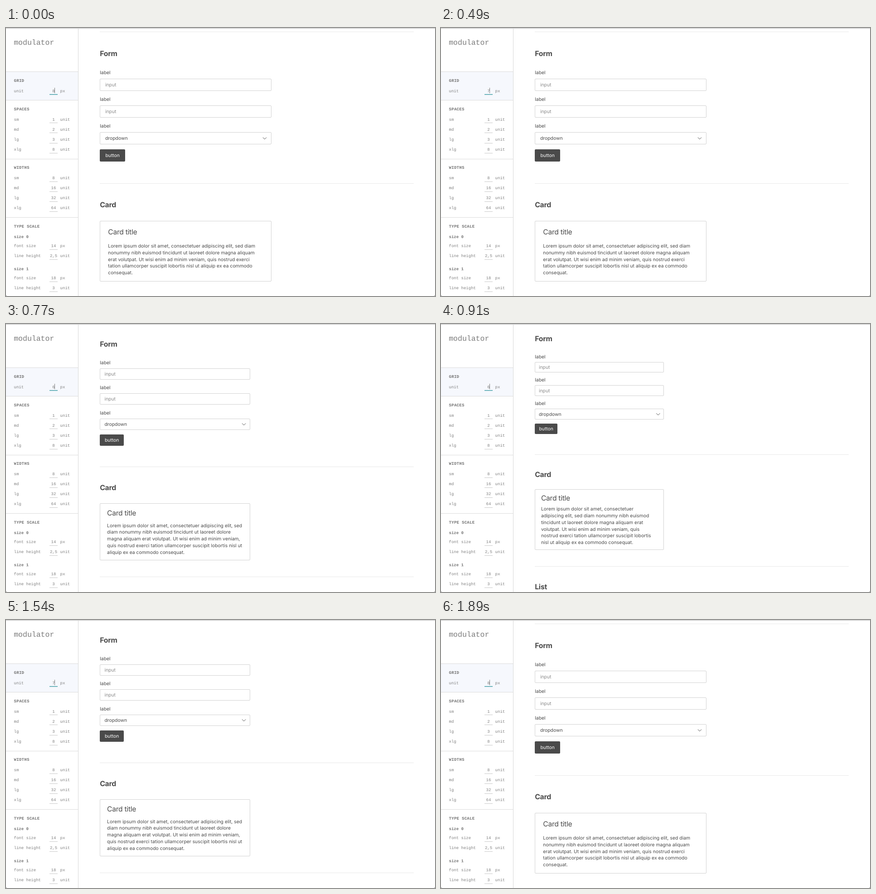
Animation of 947 by 592 pixels, one loop 2310 ms. Source, as an HTML page:

```html
<!DOCTYPE html>
<html lang="en">
<head>
<meta charset="utf-8">
<title>modulator</title>
<style>
  html, body { margin: 0; width: 100%; height: 100%; overflow: hidden; background: #fff; }
  svg { display: block; width: 947px; height: 592px; }
  text { white-space: pre; text-rendering: geometricPrecision; }
  .mono { font: 9.03px "Liberation Mono", monospace; fill: #808080; }
  .logo { font-size: 16.5px; fill: #7c7c7c; }
  .strong { font-weight: 700; fill: #747474; }
  .caps { letter-spacing: .28px; }
  .body { font: 10.4px Inter, sans-serif; fill: #4a4a4a; }
  .heading { font-size: 15.8px; font-weight: 700; letter-spacing: -.25px; }
  .title { font-size: 15.6px; letter-spacing: -.25px; }
  .hint { fill: #8a8a8a; }
  .light { fill: #fff; }
  .mid { text-anchor: middle; }
</style>
</head>
<body>
<svg viewBox="0 0 947 592">
  <g id="sidebar"></g>
  <g id="page"></g>
  <rect width="947" height="1.6" fill="#d2d2d2"/>
  <path d="M0 589v3h3q-3 0-3-3M947 589v3h-3q3 0 3-3" fill="#888"/>
</svg>
<script>
const LOOP = 2310;
const RIGHT = 900;
// [start time, unit]: the field changes first, the page follows
const FIELD = [[0, 8], [490, 7], [770, 6], [1540, 7], [1890, 8]];
const LAYOUT = [[0, 8], [630, 7], [910, 6], [1470, 7], [1680, 8]];
const PARAGRAPH = {
  8: `Lorem ipsum dolor sit amet, consectetuer adipiscing elit, sed diam
nonummy nibh euismod tincidunt ut laoreet dolore magna aliquam
erat volutpat. Ut wisi enim ad minim veniam, quis nostrud exerci
tation ullamcorper suscipit lobortis nisl ut aliquip ex ea commodo
consequat.`,
  7: `Lorem ipsum dolor sit amet, consectetuer adipiscing elit, sed
diam nonummy nibh euismod tincidunt ut laoreet dolore
magna aliquam erat volutpat. Ut wisi enim ad minim veniam,
quis nostrud exerci tation ullamcorper suscipit lobortis nisl ut
aliquip ex ea commodo consequat.`,
  6: `Lorem ipsum dolor sit amet, consectetuer
adipiscing elit, sed diam nonummy nibh euismod
tincidunt ut laoreet dolore magna aliquam erat
volutpat. Ut wisi enim ad minim veniam, quis
nostrud exerci tation ullamcorper suscipit lobortis
nisl ut aliquip ex ea commodo consequat.`
};

const text = (x, y, str, cls) => `<text x="${x}" y="${y}" class="${cls}">${str}</text>`;
const rect = (x, y, w, h, fill) =>
  `<rect x="${x}" y="${y}" width="${w}" height="${h}" fill="${fill}"/>`;
const rule = y => rect(207, Math.round(y - .5), RIGHT - 207, 1, '#e8e8e8');

function frame(top, bottom, right) {
  const y = Math.round(top), h = Math.round(bottom) - y - 1, w = Math.round(right) - 208;
  return `<rect x="207.5" y="${y + .5}" width="${w}" height="${h}" rx="1.5" fill="none" stroke="#d2d2d2"/>`;
}

function field(y, name, value, unit, active) {
  const line = active ? rect(96, Math.round(y + 7), 18, 1.5, '#45a0a8')
                      : rect(96, Math.round(y + 7.8), 18, 1, '#c9c9c9');
  return text(17.5, y + 3, name, 'mono') + line +
    text(105, y + 3, value, 'mono mid') + text(119.6, y + 3, unit, 'mono');
}

const fields = (y, rows) =>
  rows.map(([name, value, unit = 'unit'], i) => field(y + i * 22.15, name, value, unit)).join('');

function sidebar(unit) {
  const caps = (y, str) => text(17.5, y + 3, str, 'mono strong caps');
  const size = (y, str) => text(17.5, y + 3, str, 'mono strong');
  return rect(0, 97, 159, 62, '#f6f8fd') +
    [96, 159, 289, 418].map(y => rect(0, y, 159, 1, '#dcdcdc')).join('') +
    rect(159, 0, 1, 592, '#d8d8d8') +
    text(17.2, 37, 'modulator', 'mono logo') +
    caps(115.5, 'GRID') + field(138.6, 'unit', unit, 'px', true) +
    rect(107, 132, 1, 12, '#808080') +
    caps(178.5, 'SPACES') +
    fields(201.5, [['sm', 1], ['md', 2], ['lg', 3], ['xlg', 8]]) +
    caps(308, 'WIDTHS') +
    fields(331, [['sm', 8], ['md', 16], ['lg', 32], ['xlg', 64]]) +
    caps(437.5, 'TYPE SCALE') +
    size(460.5, 'size 0') + fields(481.3, [['font size', 14, 'px'], ['line height', '2,5']]) +
    size(531.5, 'size 1') + fields(552.3, [['font size', 18, 'px'], ['line height', 3]]);
}

function section(y, d, name) {
  return rule(y) + text(207.2, y + 53.2 + 1.48 * d, name, 'body heading');
}

function page(unit) {
  const d = unit - 8;
  const right = 586 + 47.25 * d;
  const boxHeight = 26.57 + 1.476 * d;
  const pitch = 59.04 + 3.69 * d;
  const textX = 218.9 + 1.48 * d;
  let out = section(8.5 + 10.45 * d, d, 'Form');

  ['input', 'input', 'dropdown'].forEach((str, i) => {
    const top = 112 + 14.1 * d + i * pitch;
    out += text(207.3, 102.2 + 13.35 * d + i * pitch, 'label', 'body') +
      frame(top, top + boxHeight, right) +
      text(textX, top + boxHeight / 2 + 3.7, str, i < 2 ? 'body hint' : 'body');
  });

  const dropTop = 112 + 14.1 * d + 2 * pitch;
  out += `<path d="M${right - 19 - 1.4 * d} ${dropTop + boxHeight / 2 - 1.7}l4 4 4-4"
    fill="none" stroke="#4a4a4a"/>`;

  const buttonTop = dropTop + boxHeight + 11.8 + 1.476 * d;
  const buttonY = Math.round(buttonTop);
  const buttonWidth = 56 + 3 * d;
  out += `<rect x="207" y="${buttonY}" width="${buttonWidth}" height="${
    Math.round(buttonTop + boxHeight) - buttonY}" rx="2" fill="#4a4a4a"/>` +
    text(207.2 + buttonWidth / 2, buttonTop + boxHeight / 2 + 3.7, 'button', 'body light mid');

  out += section(343 + 27.5 * d, d, 'Card');
  const cardX = 225.3 + 2.21 * d;
  const lines = PARAGRAPH[unit].split('\n');
  const firstLine = 485 + 36.4 * d;
  const cardBottom = firstLine + (lines.length - 1) * 14.78 + 15.9 + 1.4 * d;
  out += frame(426 + 30.5 * d, cardBottom, right) +
    text(cardX, 455.9 + 33.2 * d, 'Card title', 'body title') +
    lines.map((str, i) => text(cardX, firstLine + i * 14.78, str, 'body')).join('');

  return out + section(cardBottom + 36.3, d, 'List');
}

const valueAt = (steps, t) => steps.filter(([start]) => start <= t).pop()[1];
const shown = {};

function show(id, render, unit) {
  if (shown[id] === unit) return;
  shown[id] = unit;
  document.getElementById(id).innerHTML = render(unit);
}

function draw() {
  const t = performance.now() % LOOP;
  show('sidebar', sidebar, valueAt(FIELD, t));
  show('page', page, valueAt(LAYOUT, t));
  requestAnimationFrame(draw);
}
draw();
</script>
</body>
</html>
```
